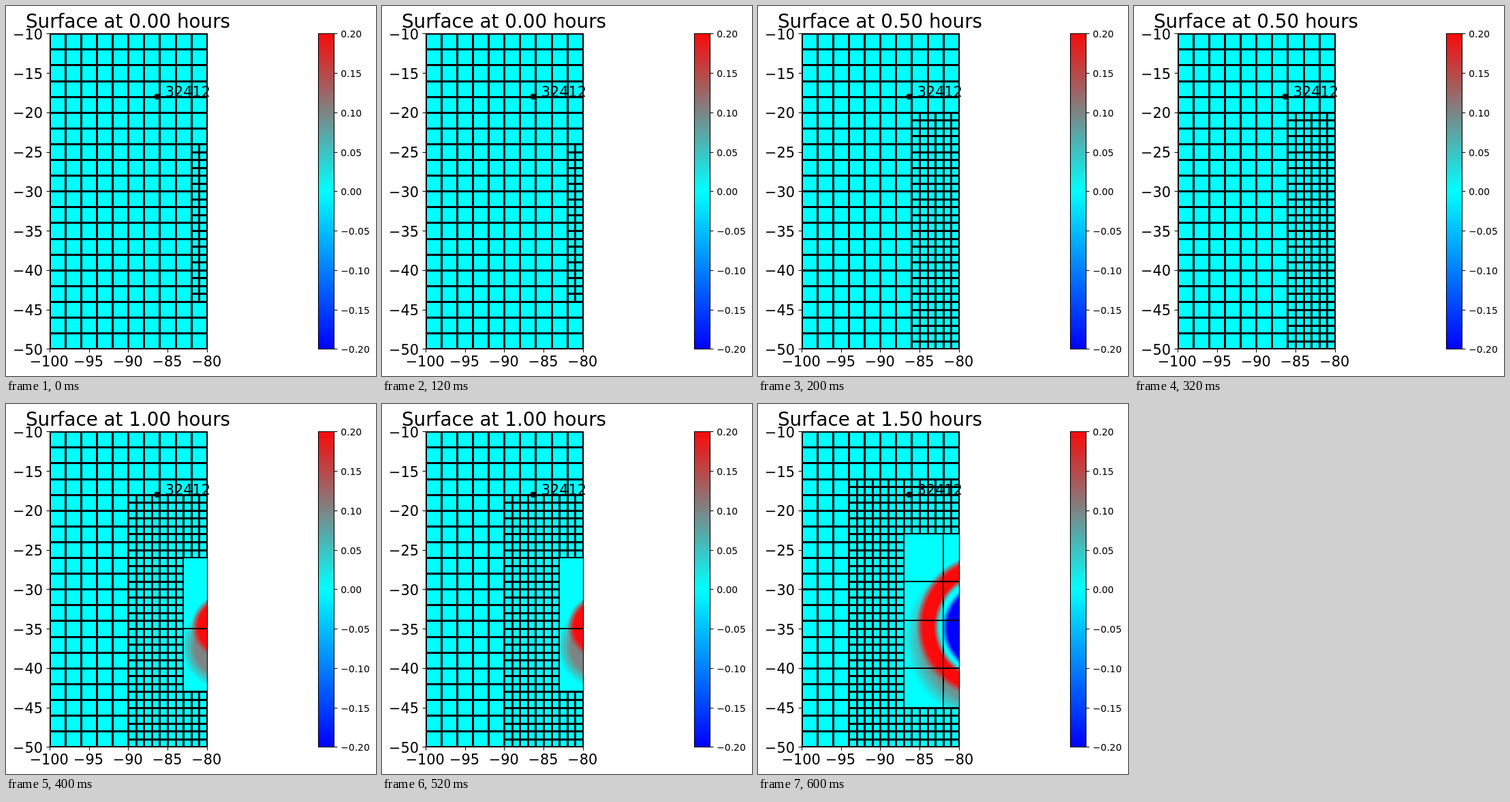
Write an HTML page with a canvas that moves like this. It is 543 px wide and 542 px high and loops after 800 ms.

```html
<!DOCTYPE html>
<html lang="en">
<head>
<meta charset="utf-8">
<title>Surface</title>
<style>
html, body { margin: 0; width: 100%; height: 100%; overflow: hidden; background: #fff; }
canvas { display: block; }
</style>
</head>
<body>
<canvas id="c" width="543" height="542"></canvas>
<script>
const g = document.getElementById('c').getContext('2d');
const CYAN = '0,255,255', RED = '250,10,10', BLUE = '0,0,255';
const STEP = 200, SCALE = 11.55, EAST = -80;
const X = lon => 64.25 + (lon + 100) * SCALE;
const Y = lat => 40.77 - (lat + 10) * SCALE;
const px = lon => Math.floor(X(lon));
const py = lat => Math.floor(Y(lat));
const rgba = (rgb, a = 1) => `rgba(${rgb},${a})`;

// fine: west, north and south of the 1-degree grid; patch: the same for the
// smooth area; waves: soft discs around one centre line, largest first
const states = [
  { fine: [-82, -24, -44] },
  { fine: [-86, -20, -50] },
  { fine: [-90, -18, -50], patch: [-83, -26, -43], lats: [-35], lons: [],
    centre: 320, waves: [
      { rgb: RED, alpha: 0.5, y: 355, r: 53, soft: 10 },
      { rgb: RED, y: 326, r: 43, soft: 5 }
    ] },
  { fine: [-94, -16, -50], patch: [-87, -23, -45], lats: [-29, -34, -40], lons: [-82],
    centre: 339, waves: [
      { rgb: RED, alpha: 0.45, y: 343, r: 110, soft: 14 },
      { rgb: RED, y: 325, r: 102, soft: 5 },
      { rgb: CYAN, y: 326, r: 77, soft: 4 },
      { rgb: BLUE, y: 328, r: 65, soft: 4 }
    ] }
];

function label(str, x, y, size, align) {
  g.font = size + 'px "DejaVu Sans", sans-serif';
  g.textAlign = align;
  g.fillStyle = '#000';
  g.fillText(str, x, Math.round(y));
}

const signed = (v, digits) => (v < 0 ? '\u2212' : '') + Math.abs(v).toFixed(digits);

// Cyan area crossed by black lines at the given longitudes and latitudes
function area([west, north, south], lons, lats, width, paint) {
  const x = px(west), y = py(north), w = px(EAST) - x, h = py(south) - y;
  g.save();
  g.beginPath();
  g.rect(x, y, w, h);
  g.clip();
  g.fillStyle = rgba(CYAN);
  g.fillRect(x, y, w, h);
  if (paint) paint();
  g.restore();
  g.fillStyle = '#000';
  for (const lon of lons) g.fillRect(px(lon) - 1, y - 1, width, h + width - 1);
  for (const lat of lats) g.fillRect(x - 1, py(lat) - 1, w + 2, width);
}

function range(from, to, step) {
  const n = Math.round((to - from) / step);
  return Array.from({ length: n + 1 }, (_, i) => from + i * step);
}

function mesh(box, step) {
  const [west, north, south] = box;
  area(box, range(west, EAST, step), range(north, south, -step), 3);
}

function disc(x, { rgb, alpha = 1, y, r, soft }) {
  const fade = g.createRadialGradient(x, y, r - soft, x, y, r + soft);
  fade.addColorStop(0, rgba(rgb, alpha));
  fade.addColorStop(1, rgba(rgb, 0));
  g.fillStyle = fade;
  g.fillRect(0, 0, 543, 542);
}

function axes() {
  g.strokeStyle = '#000';
  g.lineWidth = 1.1;
  g.strokeRect(64.5, 40.5, 231, 462);
  for (const lat of range(-10, -50, -5)) {
    g.fillStyle = '#000';
    g.fillRect(59.5, py(lat), 5, 1);
    label(signed(lat, 0), 54, Y(lat) + 8, 20.83, 'right');
  }
  for (const lon of range(-100, EAST, 5)) {
    g.fillStyle = '#000';
    g.fillRect(px(lon), 502.5, 1, 5);
    label(signed(lon, 0), X(lon) - 1, 528, 20.83, 'center');
  }
}

function colorbar() {
  const ramp = g.createLinearGradient(0, 40, 0, 502);
  [RED, CYAN, BLUE].forEach((c, i) => ramp.addColorStop(i / 2, rgba(c)));
  g.fillStyle = ramp;
  g.fillRect(458.5, 40.5, 23, 462);
  g.strokeRect(458.5, 40.5, 23, 462);
  for (let i = 0; i <= 8; i++) {
    const lat = -10 - i * 5;
    g.fillStyle = '#000';
    g.fillRect(481.5, py(lat), 5, 1);
    label(signed((4 - i) / 20, 2), 491.2, Y(lat) + 5.5, 13.89, 'left');
  }
}

function draw(n) {
  const { fine, patch, lats, lons, centre, waves } = states[n];
  g.fillStyle = '#fff';
  g.fillRect(0, 0, 543, 542);
  g.save();
  g.beginPath();
  g.rect(64, 40, 231, 462);
  g.clip();
  mesh([-100, -10, -50], 2);
  mesh(fine, 1);
  if (patch) {
    const [west, north, south] = patch;
    area(patch, [west, ...lons], [north, ...lats, south], 2,
      () => waves.forEach(w => disc(centre, w)));
  }
  g.restore();
  axes();
  colorbar();
  g.fillStyle = '#000';
  g.beginPath();
  g.arc(221.5, 132.7, 4.2, 0, 7);
  g.fill();
  label('32412', 233.8, 133, 20.83, 'left');
  label(`Surface at ${(n / 2).toFixed(2)} hours`, 179, 32, 27.78, 'center');
}

let shown = -1;
function tick() {
  const n = Math.floor(performance.now() / STEP) % states.length;
  if (n !== shown) draw(shown = n);
  requestAnimationFrame(tick);
}
tick();
</script>
</body>
</html>
```
